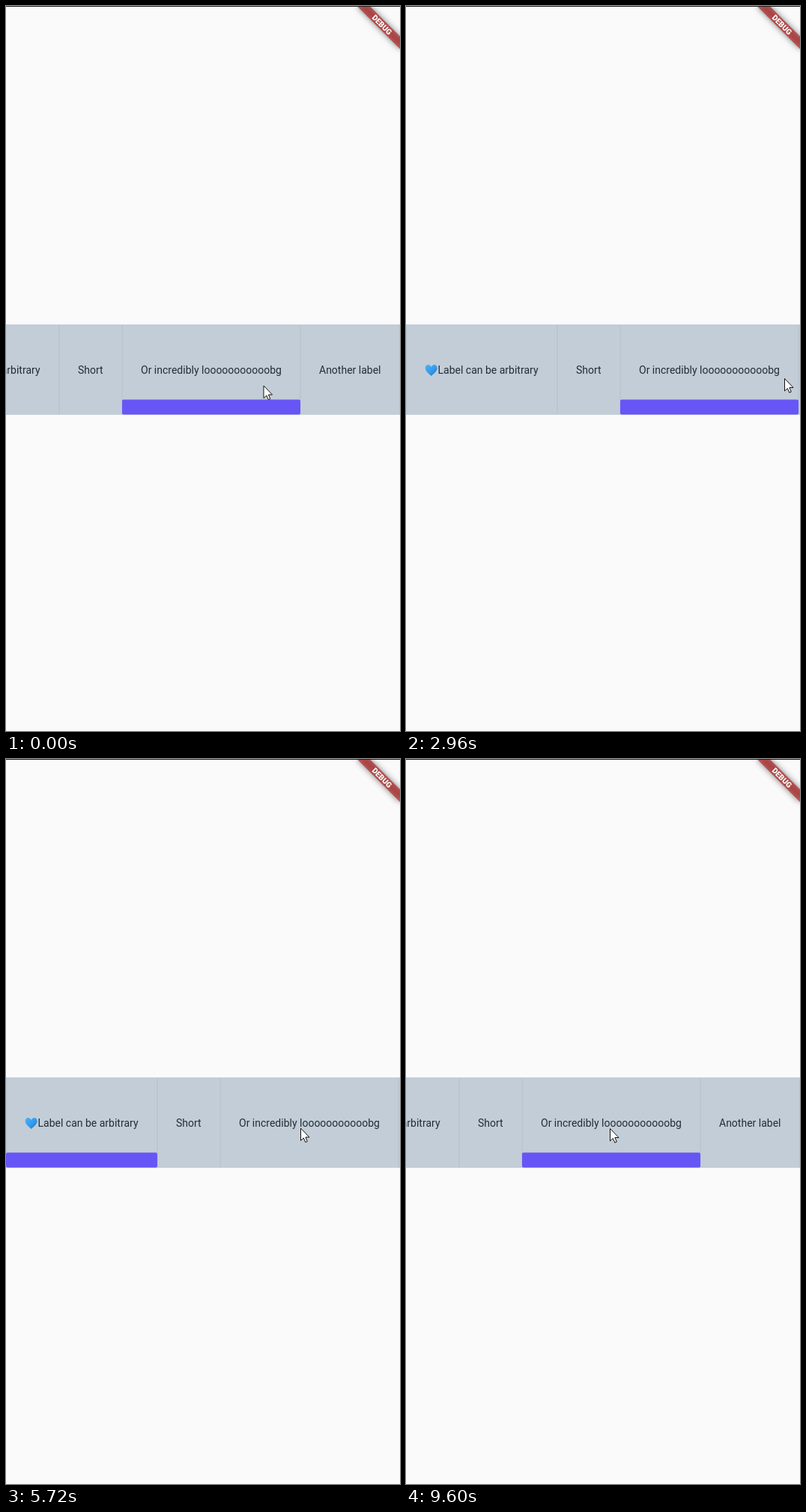
Recreate the animation shown at these times as an HTML page with a canvas. Size 526 by 968 pixels, loop 9.68 s.

```html
<!DOCTYPE html>
<html lang="en">
<head>
<meta charset="utf-8">
<title>Scrolling tab bar</title>
<style>
  html, body { margin: 0; width: 526px; height: 968px; overflow: hidden; background: #fafafa; }
  canvas { display: block; }
</style>
</head>
<body>
<canvas id="stage" width="526" height="968"></canvas>
<script>
const ctx = document.getElementById('stage').getContext('2d');
const W = 526, H = 968, LOOP = 9680, STEP = 40;
const BAR_TOP = 425.5, BAR_HEIGHT = 120;
const SLIDE = 300;

const tabs = [
  { x: 0, w: 202, label: 'Label can be arbitrary', heart: true },
  { x: 202, w: 84, label: 'Short' },
  { x: 286, w: 238, label: 'Or incredibly l' + 'o'.repeat(11) + 'bg' },
  { x: 524, w: 133, label: 'Another label' }
];

// [time, selected tab]
const taps = [[-1000, 2], [450, 0], [1344, 2], [3930, 3], [4900, 0], [5760, 2], [7000, 3], [7550, 2]];

// [time, scroll offset]
const scrollKeys = [
  [0, 131], [450, 131], [650, 0], [1344, 0], [1544, 131], [2300, 131], [2750, 0],
  [3050, 0], [3400, 131], [4900, 131], [5100, 0], [5760, 0], [5960, 131]
];

// [time, x, y]
const pointerKeys = [
  [0, 344, 507], [60, 344, 507], [420, 30, 497], [560, 30, 497], [1280, 302.5, 493.5],
  [1640, 302.5, 493.5], [2250, 374, 498], [2300, 374, 498], [2750, 505.5, 497.5],
  [3050, 505.5, 497.5], [3400, 374, 496], [3840, 476.5, 489], [4120, 476.5, 489],
  [4850, 30, 495], [4980, 30, 495], [5640, 393.5, 493], [5800, 393.5, 493],
  [6350, 440, 532], [6800, 412.5, 490.5], [7060, 412.5, 490.5], [7500, 272.5, 493.5]
];

const mix = (a, b, p) => a + (b - a) * p;
const smooth = p => p * p * (3 - 2 * p);

function sample(keys, t) {
  const next = keys.findIndex(k => k[0] > t);
  if (next < 0) return keys[keys.length - 1].slice(1);
  const a = keys[next - 1], b = keys[next];
  const p = smooth((t - a[0]) / (b[0] - a[0]));
  return a.slice(1).map((v, i) => mix(v, b[i + 1], p));
}

function indicatorAt(t) {
  const i = taps.findLastIndex(tap => tap[0] <= t);
  const to = tabs[taps[i][1]];
  const from = tabs[taps[Math.max(0, i - 1)][1]];
  const p = Math.min(1, (t - taps[i][0]) / SLIDE);
  return { x: mix(from.x, to.x, p), w: mix(from.w, to.w, p * p) };
}

function drawHeart(x, y) {
  const fill = ctx.createLinearGradient(x, y, x + 14, y + 15);
  fill.addColorStop(0, '#4db2f8');
  fill.addColorStop(0.6, '#349aeb');
  fill.addColorStop(1, '#1976c9');
  ctx.fillStyle = fill;
  ctx.beginPath();
  ctx.moveTo(x + 8, y + 3.4);
  ctx.bezierCurveTo(x + 6, y - 1.2, x, y - 0.6, x, y + 5);
  ctx.bezierCurveTo(x, y + 9.5, x + 5, y + 12.5, x + 8, y + 15.5);
  ctx.bezierCurveTo(x + 11, y + 12.5, x + 16, y + 9.5, x + 16, y + 5);
  ctx.bezierCurveTo(x + 16, y - 0.6, x + 10, y - 1.2, x + 8, y + 3.4);
  ctx.fill();
}

function drawTabs(scroll, indicator) {
  ctx.fillStyle = '#c3cdd7';
  ctx.fillRect(0, BAR_TOP, W, BAR_HEIGHT);
  ctx.save();
  ctx.translate(-scroll, 0);
  ctx.font = '14px Roboto, sans-serif';
  ctx.textAlign = 'left';
  ctx.textBaseline = 'alphabetic';
  ctx.lineWidth = 1;
  for (const { x, w, label, heart } of tabs) {
    ctx.strokeStyle = '#bac7d1';
    ctx.strokeRect(x + 0.5, BAR_TOP + 0.5, w - 1, BAR_HEIGHT - 1);
    if (heart) drawHeart(x + 25.7, 478.6);
    ctx.fillStyle = '#222e36';
    ctx.fillText(label, x + (heart ? 42.5 : 25), 491);
  }
  ctx.fillStyle = '#6756f5';
  ctx.beginPath();
  ctx.roundRect(indicator.x, 525.5, indicator.w, 20, 2);
  ctx.fill();
  ctx.restore();
}

function drawBanner() {
  ctx.save();
  ctx.translate(W, 1);
  ctx.rotate(Math.PI / 4);
  ctx.filter = 'blur(4px)';
  ctx.fillStyle = 'rgba(0,0,0,0.5)';
  ctx.fillRect(-40, 28, 80, 12);
  ctx.filter = 'none';
  ctx.fillStyle = 'rgba(183,28,28,0.63)';
  ctx.fillRect(-40, 28, 80, 12);
  ctx.fillStyle = '#fff';
  ctx.font = '900 10.2px Roboto, sans-serif';
  ctx.textAlign = 'center';
  ctx.textBaseline = 'alphabetic';
  ctx.fillText('DEBUG', 0, 37.6);
  ctx.restore();
}

function drawPointer(x, y) {
  const outline = [[0, 0], [0, 16.5], [3.8, 13], [6.3, 18.7], [8.8, 17.6], [6.4, 12], [11.5, 12]];
  ctx.beginPath();
  outline.forEach(([dx, dy]) => ctx.lineTo(x + dx, y + dy));
  ctx.closePath();
  ctx.fillStyle = '#fff';
  ctx.fill();
  ctx.strokeStyle = '#111';
  ctx.lineWidth = 1;
  ctx.stroke();
}

function draw(t) {
  ctx.fillStyle = '#fafafa';
  ctx.fillRect(0, 0, W, H);
  drawTabs(sample(scrollKeys, t)[0], indicatorAt(t));
  drawBanner();
  ctx.fillStyle = '#202124';
  ctx.fillRect(0, 0, W, 1);
  drawPointer(...sample(pointerKeys, t));
}

const start = performance.now();
function tick() {
  const t = (performance.now() - start) % LOOP;
  draw(Math.floor(t / STEP) * STEP);
  requestAnimationFrame(tick);
}
tick();
</script>
</body>
</html>
```
